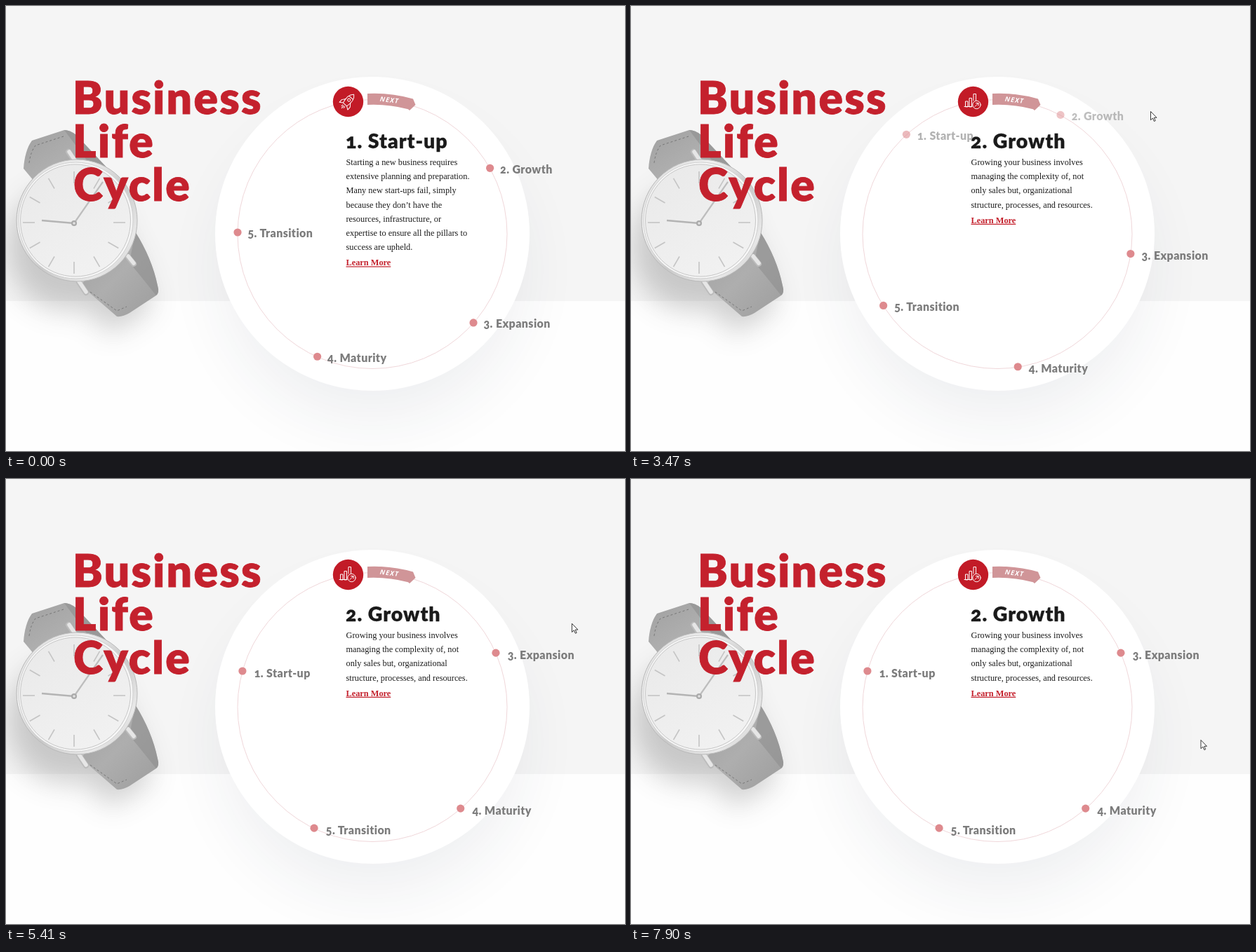
Recreate the animation shown at these times as an HTML page. Size 882x635 px, loop 7.99 s.

```html
<!DOCTYPE html>
<html lang="en">
<head>
<meta charset="utf-8">
<title>Business Life Cycle</title>
<style>
  html, body { margin: 0; width: 100%; height: 100%; overflow: hidden; background: #fefefe; }
  svg { display: block; }
  .head, .label { font-family: Lato, "Open Sans", sans-serif; font-weight: 900; font-variant-numeric: oldstyle-nums; }
  .title { font-size: 64px; letter-spacing: 2.3px; fill: #c4212d; stroke: #c4212d; stroke-width: .8; }
  .stage { font-size: 28.5px; letter-spacing: 1px; fill: #1a1a1a; stroke: #1a1a1a; stroke-width: .3; }
  .label { font-size: 16px; letter-spacing: .4px; fill: #7c7c7c; }
  .body { font: 12.33px "Liberation Serif", "Times New Roman", serif; fill: #1c1c1c; }
  .link { font-weight: bold; fill: #c4212d; text-decoration: underline; }
  .next { font: italic bold 9.5px "Open Sans", sans-serif; letter-spacing: 1px; fill: #fff; }
  .icon { fill: none; stroke: #fff; stroke-width: 1; stroke-linejoin: round; stroke-linecap: round; }
</style>
</head>
<body>
<svg width="882" height="635" viewBox="0 0 882 635">
  <defs>
    <filter id="soft" x="-50%" y="-50%" width="200%" height="200%"><feGaussianBlur stdDeviation="45"/></filter>
    <filter id="near" x="-50%" y="-50%" width="200%" height="200%"><feGaussianBlur stdDeviation="20"/></filter>
    <linearGradient id="strap" x1="0" y1="0" x2="1" y2="1">
      <stop stop-color="#a0a0a0"/><stop offset=".5" stop-color="#aeaeae"/><stop offset="1" stop-color="#9d9d9d"/>
    </linearGradient>
    <linearGradient id="steel" x1="0" y1="0" x2="1" y2="1">
      <stop stop-color="#d5d5d5"/><stop offset=".3" stop-color="#f0f0f0"/><stop offset=".55" stop-color="#c9c9c9"/>
      <stop offset=".8" stop-color="#e9e9e9"/><stop offset="1" stop-color="#bdbdbd"/>
    </linearGradient>
    <linearGradient id="dial" x1="0" y1="0" x2=".6" y2="1">
      <stop stop-color="#e9e9e9"/><stop offset="1" stop-color="#f1f1f1"/>
    </linearGradient>
  </defs>

  <rect width="882" height="421" fill="#f5f5f5"/>
  <circle cx="522" cy="376" r="212" fill="#232b4a" opacity=".07" filter="url(#soft)"/>

  <!-- watch -->
  <g filter="url(#near)" fill="#555" opacity=".28">
    <ellipse cx="86" cy="346" rx="84" ry="88"/>
    <path d="M80 395L148 468 208 430 180 345Z"/>
  </g>
  <path d="M25 232C26 216 30 201 37 192L83 177Q91 177 100 184L143 230 90 250 40 250Z" fill="url(#strap)"/>
  <path d="M83 177Q91 177 100 184L143 230 118 224Z" fill="#999"/>
  <path d="M106 398L158 443Q166 444 176 438L214 413Q219 409 216 399 208 360 184 322Z" fill="url(#strap)"/>
  <path d="M176 366L184 322Q208 360 216 399 219 409 214 413Z" fill="#8f8f8f" opacity=".6"/>
  <path d="M33 224Q35 208 42 199L82 186M120 408L158 435 172 429" fill="none" stroke="#777" stroke-dasharray="3 3"/>
  <g fill="none" stroke-linecap="round">
    <path d="M89 208L101 226M104 394L114 409M174 358L182 368" stroke="#bcbcbc" stroke-width="8"/>
    <path d="M90 208L102 226M104 393L114 408M174 357L182 367" stroke="#e6e6e6" stroke-width="5.500"/>
  </g>
  <ellipse cx="101" cy="306" rx="86" ry="87" fill="url(#steel)" stroke="#b9b9b9"/>
  <ellipse cx="99.500" cy="306" rx="81.500" ry="83" fill="#f6f6f6" stroke="#cfcfcf"/>
  <ellipse cx="99" cy="306" rx="78.500" ry="80" fill="url(#dial)" stroke="#c6c6c6"/>
  <g id="ticks" stroke="#c4c4c4" stroke-width="1.600"></g>
  <path d="M97 310L138 251" stroke="#bdbdbd" stroke-width="2.200"/>
  <path d="M97 310L51 306" stroke="#b4b4b4" stroke-width="2.400"/>
  <circle cx="97" cy="310" r="4" fill="#aaa"/><circle cx="97" cy="310" r="1.800" fill="#e4e4e4"/>

  <g class="head title">
    <text x="95" y="154">Business</text><text x="95" y="216">Life</text><text x="96" y="278">Cycle</text>
  </g>

  <!-- wheel -->
  <circle cx="522" cy="325" r="224" fill="#fff"/>
  <circle cx="522" cy="325.500" r="192" fill="none" stroke="#f0d7da"/>
  <g id="wheel"></g>
  <path d="M515 125A200 200 0 0 1 580 132.500L583.500 141 575 149 573 147.300A190 190 0 0 0 515 141Z" fill="#d09598"/>
  <text class="next" text-anchor="middle" transform="translate(546.5 134) rotate(7)" y="3.400">NEXT</text>
  <circle cx="487.500" cy="136.500" r="21.700" fill="#c21b27"/>

  <g class="panel">
    <g class="icon" transform="translate(487 136) rotate(42)">
      <path d="M0-13C5-9 5.500-2 3.500 6H-3.500C-5.500-2-5-9 0-13ZM-4.200-1L-8 4V9L-3.500 6M4.200-1L8 4V9L3.500 6M-2 8.500V11M0 8.500V13M2 8.500V11M-3.800-7H3.800"/>
      <circle cy="-2.500" r="2"/>
    </g>
  </g>
  <g class="panel">
    <g class="icon">
      <path d="M476.500 143.500V136H480V143.500ZM482 143.500V131.500H485.500V143.500ZM488 135V125.500H491.500V134.500M475 143.500H486M490 143.500L495 138.500M491.500 138.500H495V142"/>
      <circle cx="492.500" cy="141" r="5.700"/>
    </g>
  </g>

  <path id="cursor" d="M.5 .5V12.700L3.400 10 5.400 14.500 7.200 13.700 5.300 9.300H9Z" fill="#fff" stroke="#222" stroke-width=".9"/>
</svg>

<script>
const LOOP = 7990, TURN_START = 3322, TURN_TIME = 500;
const $ = s => document.querySelector(s);
const panels = [...document.querySelectorAll('.panel')];
const cursor = $('#cursor');

function add(parent, tag, attrs, text = '') {
  const el = document.createElementNS('http://www.w3.org/2000/svg', tag);
  for (const k in attrs) el.setAttribute(k, attrs[k]);
  el.textContent = text;
  parent.append(el);
  return el;
}

for (let a = 0; a < 360; a += 30)
  add($('#ticks'), 'path', { d: 'M56 0H73', transform: `translate(97 309) rotate(${a})` });

const copy = [
  ['1. Start-up', 'Starting a new business requires', 'extensive planning and preparation.',
    'Many new start-ups fail, simply', 'because they don’t have the', 'resources, infrastructure, or',
    'expertise to ensure all the pillars to', 'success are upheld.'],
  ['2. Growth', 'Growing your business involves', 'managing the complexity of, not',
    'only sales but, organizational', 'structure, processes, and resources.']
];
copy.forEach(([head, ...lines], i) => {
  const x = 484.5, y = n => 227 + 20.2 * n;
  add(panels[i], 'text', { class: 'head stage', x: x - .5, y: 202.5 }, head);
  lines.forEach((s, n) => add(panels[i], 'text', { class: 'body', x, y: y(n) }, s));
  add(panels[i], 'text', { class: 'body link', x, y: y(lines.length) + 2 }, 'Learn More');
});

const stops = [['1. Start-up', 260.4], ['2. Growth', -29.2], ['3. Expansion', 41.4],
  ['4. Maturity', 114.1], ['5. Transition', 180.6]].map(([name, angle]) => {
  const g = add($('#wheel'), 'g', {});
  add(g, 'circle', { r: 5.6, fill: '#de8a8e' });
  return { g, angle, label: add(g, 'text', { class: 'label' }, name) };
});

// Cubic bezier (.25, .1, .25, 1), solved by bisection
function ease(x) {
  if (x <= 0 || x >= 1) return x <= 0 ? 0 : 1;
  const bez = (a, b, s) => 3 * a * s * (1 - s) ** 2 + 3 * b * s * s * (1 - s) + s ** 3;
  let lo = 0, hi = 1;
  for (let i = 0; i < 20; i++) {
    const mid = (lo + hi) / 2;
    if (bez(.25, .25, mid) < x) lo = mid; else hi = mid;
  }
  return bez(.1, 1, lo);
}

// Pointer path: time, x, y
const trips = [
  [[210, 838, 569], [280, 862, 612], [360, 880, 640]],
  [[1840, 872, 423], [2620, 803, 221], [2680, 800, 218], [3160, 740, 150], [3950, 740, 150],
    [4010, 734, 147], [4080, 736.5, 143], [4800, 736.5, 143], [5490, 815, 214], [5590, 815, 214],
    [6350, 755, 133], [6450, 755, 133], [6520, 771, 143], [7290, 831.5, 250], [7900, 811.5, 372], [LOOP, 811.5, 372]]
];
function pointerAt(t) {
  for (const trip of trips)
    for (let i = 1; i < trip.length; i++) {
      const [t0, x0, y0] = trip[i - 1], [t1, x1, y1] = trip[i];
      if (t < t0 || t >= t1) continue;
      const k = (t - t0) / (t1 - t0);
      return [x0 + (x1 - x0) * k, y0 + (y1 - y0) * k];
    }
  return [-50, -50];
}

function draw(t) {
  const p = ease((t - TURN_START) / TURN_TIME);
  stops.forEach(({ g, angle, label }, i) => {
    const a = (angle - 65 * p) * Math.PI / 180;
    g.setAttribute('transform', `translate(${522 + 192 * Math.cos(a)} ${325 + 192 * Math.sin(a)})`);
    g.setAttribute('opacity', i == 0 ? Math.min(1, p * 1.15) : i == 1 ? 1 - p : 1);
    label.setAttribute('x', 14.5 + 2.3 * p);
    label.setAttribute('y', 7.3 + 1.4 * p);
  });
  panels.forEach((el, i) => el.style.display = (p > .08) == i ? '' : 'none');
  cursor.setAttribute('transform', `translate(${pointerAt(t)})`);
}

let start;
function frame(now) {
  start ??= now;
  draw((now - start) % LOOP);
  requestAnimationFrame(frame);
}
draw(0);
requestAnimationFrame(frame);
</script>
</body>
</html>
```
